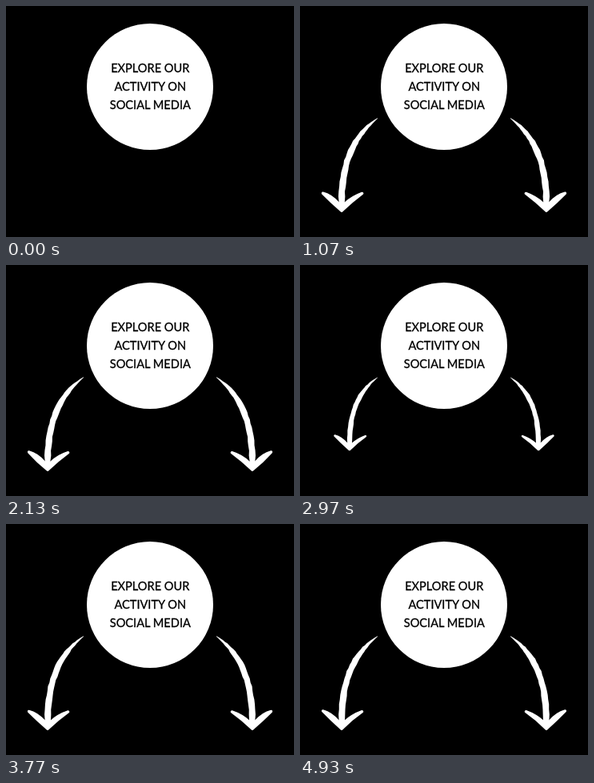
An HTML page that plays this animation: 360 px wide and 289 px high, repeating every 5030 ms.

```html
<!DOCTYPE html>
<html lang="en">
<head>
<meta charset="utf-8">
<title>Explore our activity</title>
<style>
  html, body { margin: 0; width: 100%; height: 100%; overflow: hidden; background: #000; }
  svg { display: block; width: 100vw; height: 100vh; }
  text {
    font: 400 14.6px Lato, "Open Sans", sans-serif;
    text-anchor: middle;
    stroke: #000; stroke-width: .3; stroke-linejoin: round;
  }
</style>
</head>
<body>
<svg viewBox="0 0 360 289">
  <rect width="360" height="289" fill="#000"/>
  <g id="arrows" fill="#fff" stroke="#fff" stroke-linecap="round" stroke-linejoin="round">
    <g id="arrow">
      <path id="shaft" stroke="none"/>
      <path id="head" stroke-width="3.4"/>
    </g>
    <use href="#arrow" transform="matrix(-1 0 0 1 360 0)"/>
  </g>
  <circle cx="180" cy="101" r="79" fill="#fff"/>
  <text x="180.3" y="83.3">EXPLORE OUR</text>
  <text x="180.3" y="106.3">ACTIVITY ON</text>
  <text x="180.3" y="129.3">SOCIAL MEDIA</text>
</svg>
<script>
const LOOP = 5030, FRAME = 33.4, POP = 900, VARIANTS = 5;
const STARTS = [100, 2800];
const TAIL = [97, 141];
const CURVE = [[97, 140.5], [74, 157], [51, 186], [52, 252]];
const byId = id => document.getElementById(id);
const arrow = byId("arrow"), arrows = byId("arrows");
const shaft = byId("shaft"), head = byId("head");

function random(seed) {
  return () => {
    seed = (seed * 16807) % 2147483647;
    return seed / 2147483647;
  };
}

function bezier(u, axis) {
  const v = 1 - u, [a, b, c, d] = CURVE.map(p => p[axis]);
  return v * v * v * a + 3 * v * v * u * b + 3 * v * u * u * c + u * u * u * d;
}

// Brush stroke with slightly uneven edges, redrawn for each variant
function sketch(n) {
  const rnd = random(7919 * (n + 1));
  const wob = size => (rnd() - .5) * size;
  const left = [], right = [], steps = 28;
  for (let i = 0; i <= steps; i++) {
    const u = i / steps;
    const x = bezier(u, 0), y = bezier(u, 1);
    const dx = bezier(u + .01, 0) - bezier(u - .01, 0);
    const dy = bezier(u + .01, 1) - bezier(u - .01, 1);
    const len = Math.hypot(dx, dy);
    const half = .3 + 3.5 * Math.sin(Math.min(1, u / .6) * Math.PI / 2);
    const edge = side => {
      const w = side * (half + wob(.9) * Math.min(1, u * 4));
      return (x - dy / len * w).toFixed(2) + " " + (y + dx / len * w).toFixed(2);
    };
    left.push(edge(1));
    right.unshift(edge(-1));
  }
  const pt = (x, y) => (x + wob(.7)).toFixed(2) + " " + (y + wob(.7)).toFixed(2);
  const a = pt(28.9, 234.2), b = pt(77.4, 234.6);
  return {
    shaft: "M" + left.concat(right).join("L") + "Z",
    head: `M${a}Q${pt(39, 245)} 52 256.2Q${pt(65, 244)} ${b}` +
      `Q${pt(65, 239)} 56 247.5L48.5 247.5Q${pt(39, 237)} ${a}Z`
  };
}

const sketches = Array.from({ length: VARIANTS }, (_, n) => sketch(n));

function overshoot(u) {
  const s = 2.7, v = Math.min(1, u) - 1;
  return 1 + (s + 1) * v * v * v + s * v * v;
}

function draw(t) {
  const start = t < STARTS[1] + 30 ? STARTS[0] : STARTS[1];
  const step = Math.floor((t - start - 30) / FRAME);
  arrows.setAttribute("visibility", step < 0 ? "hidden" : "visible");
  if (step < 0) return;
  const k = overshoot((30 + step * FRAME) / POP);
  const look = sketches[Math.floor((t - 30) / 100) % VARIANTS];
  shaft.setAttribute("d", look.shaft);
  head.setAttribute("d", look.head);
  arrow.setAttribute("transform",
    `translate(${TAIL}) scale(${k.toFixed(4)}) translate(${-TAIL[0]} ${-TAIL[1]})`);
}

const begin = performance.now();
function tick() {
  draw((performance.now() - begin) % LOOP);
  requestAnimationFrame(tick);
}
tick();
</script>
</body>
</html>
```
